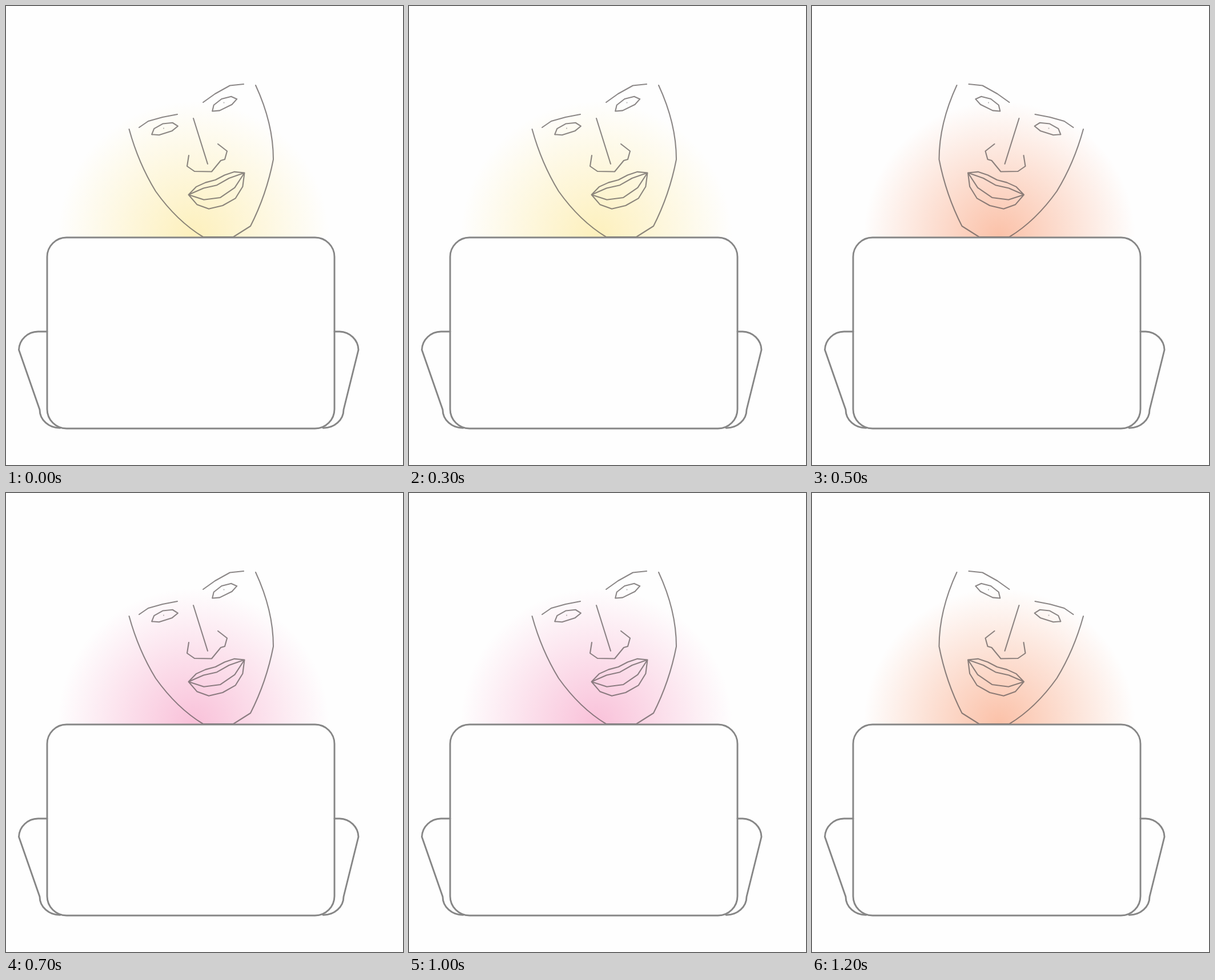
Animation, 695 px wide and 805 px high, one loop 1.4 s. Source, as an HTML page with a canvas:

```html
<!DOCTYPE html>
<html lang="en">
<head>
<meta charset="utf-8">
<title>Face behind a screen</title>
<style>
  html, body { margin: 0; width: 100%; height: 100%; overflow: hidden; background: #fefefe; }
  canvas { display: block; width: 695px; height: 805px; }
</style>
</head>
<body>
<canvas width="695" height="805"></canvas>
<script>
const W = 695, H = 805, LOOP = 1400;
const MIRROR = 690.5; // flipped x = MIRROR - x
const PAPER = '#fefefe';
const ctx = document.querySelector('canvas').getContext('2d');

const YELLOW = '253,240,188', ORANGE = '251,193,168', PINK = '249,193,217';
const poses = [
  { until: 500,  rgb: YELLOW, flip: false },
  { until: 700,  rgb: ORANGE, flip: true },
  { until: 1200, rgb: PINK,   flip: false },
  { until: LOOP, rgb: ORANGE, flip: true }
];

// Adds a polyline given in a frame centred on (x, y) and turned by angle.
function addTurned(path, x, y, angle, points) {
  const c = Math.cos(angle), s = Math.sin(angle);
  points.forEach(([u, v], i) =>
    path[i ? 'lineTo' : 'moveTo'](x + u * c - v * s, y + u * s + v * c));
}

// Almond: 45 degree steps along the upper lid, 60 degree steps along the lower.
function addEye(path, x, y, angle) {
  const points = [];
  const lid = (steps, height, dir) => {
    for (let i = 0; i <= steps; i++) {
      const a = Math.PI * i / steps;
      points.push([-24 * dir * Math.cos(a), height * Math.sin(a)]);
    }
  };
  lid(4, -12, 1);
  lid(3, 5.5, -1);
  addTurned(path, x, y, angle, points);
}

// A lip line is symmetric: half of it, from the corner to the middle, is enough.
function addLip(path, half) {
  const all = [[52.6, 0], ...half];
  const left = all.map(([u, v]) => [-u, v]);
  const right = all.slice(0, -1).reverse();
  const skewed = [...left, ...right].map(([u, v]) => [u - v / 10, v]);
  addTurned(path, 368.5, 311.75, -0.374, skewed);
}

function makeFace() {
  const path = new Path2D(
    // jaw
    'M215.5 216Q232 276 262 325Q299 377 345 405L398 405 428 386' +
    'Q456 331 468 269Q468 206 437 139' +
    // brows
    'M233 213L249 202 274 195 300 190M345 169L366 154 392 139.5 416 137' +
    // nose
    'M328 197L353 277M320 262L317 281 330 290 360 290.5 376 271 383 269 387 254.5 371 242');
  addEye(path, 278, 218, -0.309);
  addEye(path, 382.7, 173.8, -0.459);
  addLip(path, [[36, -8], [18, -9], [0, -7]]);
  addLip(path, [[24, -1], [0, 2.5]]);
  addLip(path, [[29, 18], [0, 25]]);
  addLip(path, [[43, 21.4], [25, 36], [0, 39.5]]);
  return path;
}

const face = makeFace();
const arms = new Path2D(
  'M72 571H56A34 33 0 0 0 22.5 603L59 708A35 32 0 0 0 95 740' +
  'M575 571H584A34 33 0 0 1 617 603L591 708A35 32 0 0 1 555 740');
const screen = new Path2D();
screen.roundRect(72, 406, 503, 335, 34);

function drawGlow(rgb) {
  const x = 328, y = 405;
  const glow = ctx.createRadialGradient(x, y, 0, x, y, 238);
  glow.addColorStop(0, `rgba(${rgb},1)`);
  glow.addColorStop(1, `rgba(${rgb},0)`);
  ctx.fillStyle = glow;
  ctx.fillRect(0, 0, W, y);
}

function drawFace(flip) {
  ctx.save();
  if (flip) ctx.transform(-1, 0, 0, 1, MIRROR, 0);
  ctx.strokeStyle = 'rgba(92,86,86,.7)';
  ctx.lineWidth = 2.1;
  ctx.stroke(face);
  ctx.fillStyle = 'rgba(120,120,120,.5)';
  ctx.fillRect(275, 213.5, 2, 2);
  ctx.fillRect(380.5, 168.5, 2, 2);
  ctx.restore();
}

function drawComputer() {
  ctx.fillStyle = PAPER;
  ctx.fill(screen);
  ctx.strokeStyle = '#868686';
  ctx.lineWidth = 2.9;
  ctx.stroke(screen);
  ctx.stroke(arms);
}

function draw(time) {
  const { rgb, flip } = poses.find(p => time % LOOP < p.until);
  ctx.fillStyle = PAPER;
  ctx.fillRect(0, 0, W, H);
  ctx.lineJoin = ctx.lineCap = 'round';
  drawGlow(rgb);
  drawFace(flip);
  drawComputer();
}

const start = performance.now();
function tick() {
  draw(performance.now() - start);
  requestAnimationFrame(tick);
}
tick();
</script>
</body>
</html>
```
